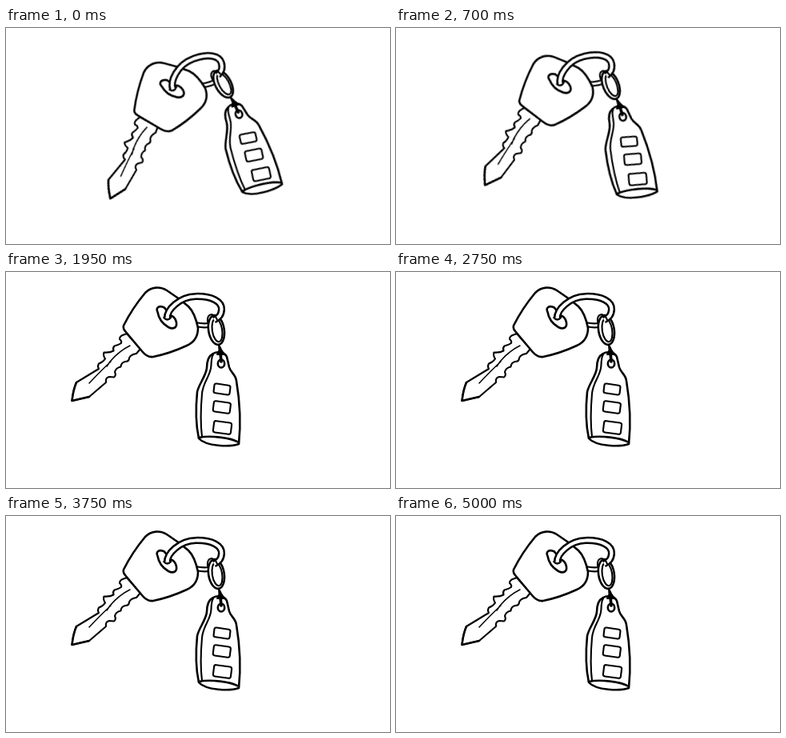
Write an HTML page that moves like this. It is 480x270 px and loops after 5.05 s.

```html
<!DOCTYPE html>
<html lang="en">
<head>
<meta charset="utf-8">
<title>Swinging keys</title>
<style>
  html, body { margin: 0; width: 100%; height: 100%; overflow: hidden; background: #fff; }
  svg { display: block; width: 100%; height: 100%; }
  #keys {
    transform-origin: 260px 46px;
    fill: #fff; stroke: #000; stroke-width: 2.6;
    stroke-linecap: round; stroke-linejoin: round;
  }
  .mid { stroke-width: 2.1; }
  .thin { stroke-width: 1.5; }
  .line { fill: none; }
  .band { fill: none; stroke-width: 9.2; stroke-linecap: butt; }
  .core { fill: none; stroke: #fff; stroke-width: 4.2; stroke-linecap: butt; }
</style>
</head>
<body>
<svg viewBox="0 0 480 270">
  <defs>
    <path id="ring" d="M201.500 58 C201 47 217 31 237 30.500 C258 30 270 37 269.500 47 C269 54 266 57 260 60"/>
  </defs>
  <g id="keys">
    <!-- lower run of the big ring, behind the key -->
    <path class="line mid" d="M237 63 Q246 65 253 64 M238 68 Q246 70 253 69"/>

    <!-- blade -->
    <path class="mid" d="M151 77 L147 78.500 Q142 80 142 84 Q145 86 144 89 Q141 91 135.500 92.500
      Q133 95 134.500 98.500 Q130 101 122.500 100.500 Q121 104 124 108.500
      Q121 113 116 114.500 Q114 118 116 121 L88 138 Q84 147 82.500 161 L104 156
      L125 138 Q124 132 129 131 L135 131.500 Q138 129 136 125 Q137 120 143.500 118.500
      Q144 113 149 112 Q154 112 154 107.500 Q156 103 163 102 L168 96 Z"/>
    <path class="line" d="M88 138 Q84 147 82.500 161 L104 156"/>
    <path class="line thin" d="M155 92 Q141 99 130 112 L126 118 M131 112 Q119 123 104 139"/>

    <!-- head -->
    <path d="M147 67 C154 53 164 38 174 26 C182 18 193 18 201 23
      C212 30 221 37 228 43 C235 50 238 60 240 70 C240 80 235 88 226 92
      C213 98 199 103 184 106 C178 107 174 104 170 99 L149 74 Q146 71 147 67 Z"/>
    <path d="M198 44.500 C191 41 187 45 189.500 50 C191 59 196 65 203 69
      C209 72 214 70 213 63 C212 58 209 55 205 54 Z"/>

    <!-- small link -->
    <g transform="rotate(-9 263 73)">
      <ellipse cx="263" cy="72.500" rx="9.800" ry="18.500"/>
      <ellipse class="mid" cx="264" cy="73" rx="6.200" ry="14.500"/>
    </g>

    <!-- big ring -->
    <path class="line" d="M197.500 57 Q201.500 62 206 57"/>
    <use href="#ring" class="band"/>
    <use href="#ring" class="core"/>
    <path class="line mid" d="M252 62 Q251 54 257 53 Q262 54 264 60"/>

    <!-- fob -->
    <path d="M259 102 C264 99 273 100 276 106 L279 119 C281 126 287 128 288 136
      C292 160 294 187 291 215 C280 219 250 218 241 208 C237 190 237 170 239 150
      C241 140 250 130 251 120 C251 111 253 105 259 102 Z"/>
    <path class="line mid" d="M259 103 C255 110 258 117 255 124
      C253 132 246 140 245 152 C243 175 243 190 245 206"/>
    <path class="line" d="M241 207 C255 204 281 207 291 213"/>
    <ellipse cx="269" cy="114.500" rx="4.200" ry="5"/>
    <path d="M266 91 L266.500 98 L264 103 L273 103 L269 97 Z" fill="#000" stroke-width="2"/>
    <path class="line" stroke-width="3.600" d="M268 101 L269 112"/>
    <g id="buttons" class="mid"></g>
  </g>
</svg>
<script>
  const LOOP = 5050, STEP = 50;
  const keys = document.getElementById('keys');

  // Buttons: centre x, centre y, width, height
  const buttons = [[270, 146.5, 20, 12], [269.8, 169, 21, 13.5], [270.5, 194.5, 22, 14.5]];
  document.getElementById('buttons').innerHTML = buttons.map(([x, y, w, h]) =>
    `<rect x="${-w / 2}" y="${-h / 2}" width="${w}" height="${h}" rx="2.5"
      transform="translate(${x} ${y}) skewY(8) skewX(-7)"/>`).join('');

  // Swing angle in degrees for each step, then at rest
  const swing = [-19.3, -47, -71, -80, -66, -34, -5, 3.8, -13,
    -45, -72, -76, -59, -35, -12.4, -2, 0];

  const frames = swing.map((angle, i) => ({
    offset: i * STEP / LOOP,
    transform: `rotate(${angle}deg)`,
    easing: 'step-end'
  }));
  frames.push({ offset: 1, transform: 'rotate(0deg)' });
  keys.animate(frames, { duration: LOOP, iterations: Infinity });
</script>
</body>
</html>
```
